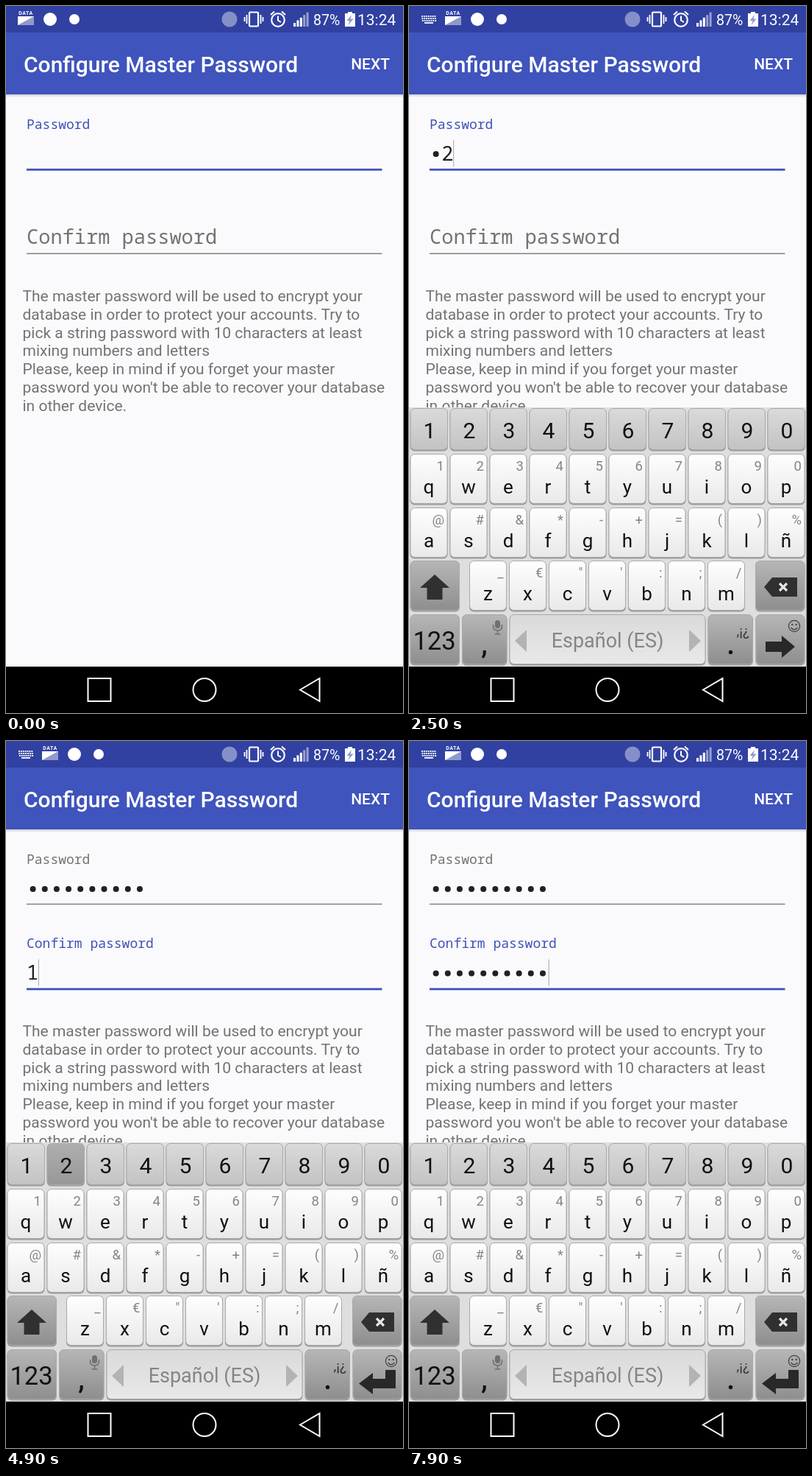
An HTML page that plays this animation: 540x960 px, repeating every 8000 ms.

```html
<!DOCTYPE html>
<html lang="en">
<head>
<meta charset="utf-8">
<title>Configure Master Password</title>
<style>
html, body { margin: 0; width: 100%; height: 100%; overflow: hidden; background: #fafafc; }
svg { display: block; width: 100vw; height: 100vh; }
text { font-family: Roboto, sans-serif; white-space: pre; }
.mono { font-family: "Noto Sans Mono", monospace; }
</style>
</head>
<body>
<svg id="stage" viewBox="0 0 540 960" xmlns="http://www.w3.org/2000/svg"></svg>
<script>
const LOOP = 8000;
const BLUE = '#3f51b8', GREY = '#737373', INK = '#111';
const FIELD_X = 28, PITCH = 16.2;
const DIGITS = '1234567890';

// Moments at which each typed digit appears, and how long its key is held before
const first = { times: [...DIGITS].map((_, i) => 2200 + 205 * i), hold: 90, mask: 4450 };
const second = {
  times: [4800, 5000, 5180, 5360, 5540, 5700, 5870, 6030, 6250, 6500],
  hold: 140, mask: 7050
};
const KEYBOARD_IN = 1650, KEYBOARD_TIME = 200, FOCUS = 4450, FLOAT_TIME = 200;

const text = (x, y, size, fill, str, extra = '') =>
  `<text x="${x}" y="${y}" font-size="${size}" fill="${fill}" ${extra}>${str}</text>`;
const rect = (x, y, w, h, fill, extra = '') =>
  `<rect x="${x}" y="${y}" width="${w}" height="${h}" fill="${fill}" ${extra}/>`;
const path = (d, fill, extra = '') => `<path d="${d}" fill="${fill}" ${extra}/>`;
const circle = (x, y, r, fill, extra = '') =>
  `<circle cx="${x}" cy="${y}" r="${r}" fill="${fill}" ${extra}/>`;
const line = (d, color, width) => path(d, 'none', `stroke="${color}" stroke-width="${width}"`);
const gradient = (id, top, bottom) =>
  `<linearGradient id="${id}" x2="0" y2="1"><stop stop-color="${top}"/><stop offset="1" stop-color="${bottom}"/></linearGradient>`;
const MID = 'text-anchor="middle"', END = 'text-anchor="end"';

function statusBar() {
  const bars = [0, 1, 2, 3, 4].map(i =>
    rect(391 + i * 4.4, 23 - i * 3.6, 3, 5 + i * 3.6, '#fff', i > 2 ? 'opacity=".5"' : '')).join('');
  const dots = [0, 1, 2].map(r => [...'1234567'].map((_, c) =>
    rect(17 + c * 2.9 + r * .4, 13 + r * 3, 1.9, 1.9, '#fff')).join('')).join('');
  return rect(0, 0, 540, 36, '#3141a1') +
    `<g id="imeIcon">${dots}${rect(21, 22, 12, 1.8, '#fff')}</g>` +
    `<g id="notices">
      ${text(27, 12, 7, '#fff', 'DATA', MID + ' font-weight="700" letter-spacing=".5"')}
      ${rect(16, 14, 22, 12, '#8f9acb')}${path('M16 14H38L16 26Z', '#fff')}
      ${circle(60, 18, 9, '#fff')}${circle(93, 18, 7, '#fff')}
    </g>` +
    circle(304, 18, 10.5, '#8590c8') +
    rect(331, 8.5, 12, 19, 'none', 'stroke="#fff" stroke-width="2.2" rx="1"') +
    line('M327.5 12V24M346.5 12V24M324.5 15V21M349.5 15V21', '#fff', 1.8) +
    circle(370, 19, 8.8, 'none', 'stroke="#fff" stroke-width="2.2"') +
    line('M370 13.5V19.5L374 22M360 12L365 7.5M380 12L375 7.5', '#fff', 2) +
    bars + text(418, 26, 19.5, '#fff', '87%') +
    path('M465 8H471V10H475V28H461V10H465Z', '#fff') +
    path('M470 12L463.5 20H467.5L465.5 26L472.5 17.5H468.5Z', '#8e99d0') +
    text(478, 26, 21, '#fff', '13:24');
}

function page() {
  const lines = [
    'The master password will be used to encrypt your',
    'database in order to protect your accounts. Try to',
    'pick a string password with 10 characters at least',
    'mixing numbers and letters',
    'Please, keep in mind if you forget your master',
    "password you won't be able to recover your database",
    'in other device.'
  ];
  const field = (id, y) =>
    `<rect id="${id}Line" x="28" width="483.5"/><g id="${id}Dots">${
      [...DIGITS].map((_, i) => circle(36.6 + 16.15 * i, y - 20.5, 4, '#212121')).join('')}</g>` +
    text(0, y - 12, 27, '#212121', '', `id="${id}Digit" class="mono"`) +
    rect(0, y - 39.5, 1.2, 36, '#b4b4b6', `id="${id}Cursor"`);
  return rect(0, 0, 540, 960, '#fafafc') +
    rect(0, 120, 540, 4, 'url(#shade)') + rect(0, 36, 540, 84, '#3f54bd') +
    text(24, 90, 30, '#fff', 'Configure Master Password', 'font-weight="500"') +
    text(522, 86, 21, '#fff', 'NEXT', END + ' font-weight="500"') +
    text(FIELD_X, 167, 18, BLUE, 'Password', 'id="label1" class="mono"') +
    text(FIELD_X, 323, 27, GREY, 'Confirm password', 'id="label2" class="mono"') +
    field('a', 221.5) + field('b', 336) +
    lines.map((s, i) => text(22.5, 401 + i * 24.8, 21, GREY, s)).join('');
}

function key(x, y, w, h, fill, extra = '') {
  return rect(x, y + 1.5, w, h, '#9b9b9b', 'rx="6"') +
    rect(x + .5, y + .5, w - 1, h - 1, `url(#${fill})`, `rx="6" stroke="#a9a9a9" ${extra}`);
}

function letterRow(x0, y, letters, hints) {
  return [...letters].map((c, i) => {
    const x = x0 + 54 * i;
    return key(x, y, 51, 68, 'light') +
      text(x + 46.5, y + 23, 18.5, '#858585', hints[i], END) +
      text(x + 25.5, y + 54, 26, INK, c, MID);
  }).join('');
}

function keyboard() {
  const numbers = [...DIGITS].map((c, i) =>
    key(1.5 + 54 * i, 546, 51.5, 57, 'mid', `id="key${i}"`) +
    text(28 + 54 * i, 587, 30, INK, c, MID)).join('');
  const dark = '#303030';
  return rect(0, 545, 540, 352, '#dedede') + numbers +
    letterRow(1.5, 608, 'qwertyuiop', DIGITS) +
    letterRow(1.5, 681, 'asdfghjklñ', ['@', '#', '&amp;', '*', '-', '+', '=', '(', ')', '%']) +
    letterRow(82, 753, 'zxcvbnm', '_€"\':;/') +
    key(1.5, 753, 67.5, 68, 'dark') +
    path('M35 772L55 790H45.5V806H24.5V790H15Z', dark) +
    key(471, 753, 67.5, 68, 'dark') +
    path('M483 789L494 776H528V802H494Z', dark) +
    line('M504 784L514 794M514 784L504 794', '#e6e6e6', 3.2) +
    key(1.5, 826, 67.5, 68, 'dark') + text(34.5, 874, 34.5, INK, '123', MID) +
    key(72, 826, 61.5, 68, 'dark') + text(102.5, 879, 38, INK, ',', MID + ' font-weight="500"') +
    rect(117, 834, 7, 11, '#707070', 'rx="3.5"') +
    line('M114.5 840V842Q114.5 848 120.5 848T126.5 842V840M120.5 848V853M116.5 853H124.5', '#707070', 1.6) +
    key(136.5, 826, 267, 68, 'space') +
    path('M160 847V877L144 862ZM381 847V877L397 862Z', '#b3b3b3') +
    text(270, 871, 27, '#858585', 'Español (ES)', MID) +
    key(406.5, 826, 61.5, 68, 'dark') + circle(437.5, 877.5, 2.7, INK) +
    text(463, 855, 19, '#333', ',¡¿', END) +
    key(471.5, 826, 67, 68, 'dark', 'id="action"') +
    circle(524, 842, 7.6, 'none', 'stroke="#444" stroke-width="1.3"') +
    circle(521.3, 840, 1.2, '#444') + circle(526.7, 840, 1.2, '#444') +
    line('M519.5 844Q524 849.5 528.5 844', '#444', 1.3) +
    path('M485 863H507V855L525 870L507 885V877H485Z', '#282828', 'id="nextIcon"') +
    path('M530 854V879H499V887L480 872.5L499 858V866H516V854Z', '#282828', 'id="enterIcon"');
}

const navBar = () => rect(0, 897, 540, 63, '#000') +
  `<g fill="none" stroke="#fff" stroke-width="2"><rect x="111.5" y="913" width="31" height="31"/>
   <circle cx="270" cy="928.5" r="15.5"/><path d="M400 928.5L426.5 913V944Z"/></g>`;

document.getElementById('stage').innerHTML = '<defs>' +
  gradient('light', '#fefefe', '#e9e9e9') + gradient('mid', '#dadada', '#c3c3c3') +
  gradient('dark', '#b6b6b6', '#8e8e8e') + gradient('space', '#dadada', '#e8e8e8') +
  gradient('held', '#aeaeae', '#989898') + gradient('shade', '#cfcfd6', '#fafafc') + '</defs>' +
  page() + `<g id="keyboard">${keyboard()}</g>` + statusBar() + navBar();

const $ = id => document.getElementById(id);
const set = (id, attrs) => { for (const k in attrs) $(id).setAttribute(k, attrs[k]); };
const show = (id, on) => set(id, { visibility: on ? 'visible' : 'hidden' });
const clamp = v => Math.max(0, Math.min(1, v));
const ease = v => 1 - (1 - clamp(v)) ** 2;
const mix = (a, b, p) => a + (b - a) * p;

function drawField(id, entry, t, y, focused, cursorOn) {
  const count = entry.times.filter(at => t >= at).length;
  const plain = count > 0 && t < entry.mask;
  const dots = plain ? count - 1 : count;
  [...$(id + 'Dots').children].forEach((dot, i) =>
    dot.setAttribute('visibility', i < dots ? 'visible' : 'hidden'));
  $(id + 'Digit').textContent = plain ? DIGITS[count - 1] : '';
  set(id + 'Digit', { x: FIELD_X + PITCH * dots });
  set(id + 'Cursor', { x: FIELD_X + PITCH * count - .4 });
  show(id + 'Cursor', focused && cursorOn);
  set(id + 'Line', focused
    ? { y: y - .7, height: 2.8, fill: BLUE }
    : { y: y - .7, height: 1.4, fill: '#7b7b7b' });
}

function render(t) {
  const up = t >= KEYBOARD_IN;
  const onSecond = t >= FOCUS;
  const slide = ease((t - KEYBOARD_IN) / KEYBOARD_TIME);
  set('keyboard', { transform: `translate(0 ${352 * (1 - slide)})` });
  show('keyboard', up);
  show('imeIcon', up);
  set('notices', { transform: `translate(${up ? 33 : 0} 0)` });

  const idleBlink = (t + 950) % 1000 < 500;
  drawField('a', first, t, 221.5, !onSecond, up || idleBlink);
  drawField('b', second, t, 336.2, onSecond, t < 7400 || t >= 7900);

  const float = ease((t - FOCUS) / FLOAT_TIME);
  set('label1', { fill: onSecond ? GREY : BLUE });
  set('label2', {
    y: mix(323, 281, float), 'font-size': mix(27, 18, float), fill: onSecond ? BLUE : GREY
  });

  for (let i = 0; i < 10; i++) {
    const held = [first, second].some(e => t >= e.times[i] - e.hold && t < e.times[i]);
    set('key' + i, { fill: `url(#${held ? 'held' : 'mid'})` });
  }
  set('action', { fill: t >= 4330 && t < FOCUS ? '#858585' : 'url(#dark)' });
  show('nextIcon', up && !onSecond);
  show('enterIcon', onSecond);
}

const start = performance.now();
function tick() {
  render((performance.now() - start) % LOOP);
  requestAnimationFrame(tick);
}
render(0);
requestAnimationFrame(tick);
</script>
</body>
</html>
```
